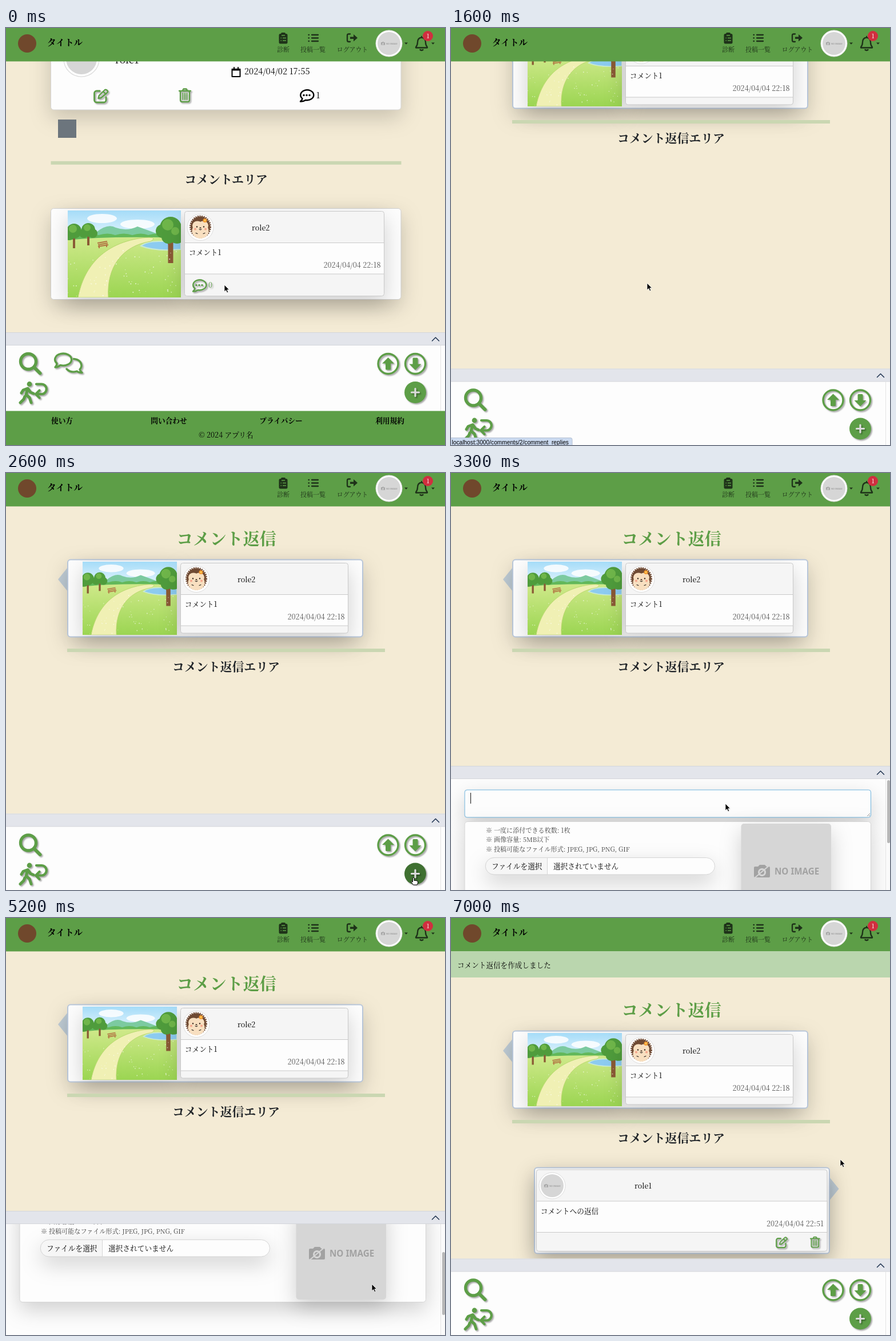
Animation, 768 px wide and 729 px high, one loop 7100 ms. Source, as an HTML page:

```html
<!DOCTYPE html>
<html lang="ja">
<head>
<meta charset="utf-8">
<style>
html, body { margin: 0; height: 100%; overflow: hidden; background: #f4ebd5; }
svg { display: block; width: 100vw; height: 100vh; }
text { font-family: 'Noto Serif CJK JP', 'Noto Serif', 'Noto Sans CJK JP', serif; font-weight: 500; }
.bold { font-weight: 700; }
.sans { font-family: 'Noto Sans', sans-serif; }
.mid { text-anchor: middle; }
.end { text-anchor: end; }
.soft { filter: drop-shadow(0 13px 18px rgba(0, 0, 0, .18)); }
.lift { filter: drop-shadow(2px 2px 1px rgba(0, 0, 0, .35)); }
.line { fill: none; stroke: currentColor; stroke-linecap: round; stroke-linejoin: round; }
.green { color: #5d9e47; fill: #5d9e47; }
</style>
</head>
<body>
<svg id="stage" viewBox="0 0 768 729">
  <defs>
    <linearGradient id="sky" x2="0" y2="1"><stop stop-color="#a5dcf8"/><stop offset="1" stop-color="#f4fbff"/></linearGradient>
    <linearGradient id="grass" x2="0" y2="1"><stop stop-color="#cfe98a"/><stop offset="1" stop-color="#9bd552"/></linearGradient>
    <clipPath id="panelClip"><path d="M0 23h768v300H0z"/></clipPath>
    <symbol id="park" viewBox="0 0 198 152" preserveAspectRatio="none">
      <path fill="url(#sky)" d="M0 0h198v60H0z"/>
      <g fill="#fff" opacity=".85"><ellipse cx="60" cy="14" rx="26" ry="8"/><ellipse cx="122" cy="24" rx="30" ry="8"/></g>
      <path fill="#7ccaa0" d="M0 48Q30 36 50 38 70 22 84 30 104 37 122 28 142 35 160 42L198 38V60H0z"/>
      <path fill="#62b85a" d="M0 43q14-5 25 0 15-5 29 0 16-5 29 0 15-5 30 0 15-5 28 0 15-5 28 0l29-2v22H0z"/>
      <path fill="url(#grass)" d="M0 52Q70 44 198 48V152H0z"/>
      <path fill="#8ccbf0" stroke="#c9ead4" stroke-width="2" d="M128 62q10-9 36-8h34v14q-45 4-70-6z"/>
      <path fill="#f0f0b4" stroke="#b5d66a" d="M18 152C26 110 52 59 130 48q30-3 15 6C94 62 68 100 71 152z"/>
      <g fill="none" stroke="#8a5a35"><path stroke-width="4" d="M11 44v22M36 43v18"/><path stroke-width="9" d="M180 48v44"/><path stroke-width="3" d="M180 62l-10-12"/></g>
      <g fill="#4f9c3c"><circle cx="11" cy="36" r="13"/><circle cx="3" cy="43" r="9"/><circle cx="36" cy="34" r="12"/><circle cx="44" cy="40" r="8"/><circle cx="28" cy="40" r="8"/><circle cx="180" cy="30" r="19"/><circle cx="166" cy="36" r="12"/><circle cx="191" cy="43" r="15"/><circle cx="176" cy="46" r="12"/></g>
      <g fill="#6fb64a"><circle cx="9" cy="32" r="7"/><circle cx="34" cy="30" r="6"/><circle cx="175" cy="25" r="10"/><circle cx="188" cy="36" r="7"/></g>
      <path fill="none" stroke="#b27342" stroke-width="2" d="M52 57l17-3M53 60l17-3M53 63l18-3M55 61v5M68 59v5"/>
      <g id="flowers" fill="#fff" opacity=".65"/>
    </symbol>
    <g id="noImage" fill="#a2a2a2">
      <path fill-rule="evenodd" d="M-54-8h5l3-3h9l3 3h4q2 0 2 2V9q0 2-2 2h-24q-2 0-2-2V-6q0-2 2-2zM-42-5a7 7 0 1 0 .1 0z"/>
      <circle cx="-42" cy="2" r="4"/><path stroke="#d6d6d6" stroke-width="2" d="M-55 12l26-22"/>
      <text class="sans bold" x="-20" y="6" font-size="15.2">NO IMAGE</text>
    </g>
    <g id="blank"><circle r="23" fill="#fff" stroke="#ddd"/><circle r="20" fill="#d6d6d6"/><use href="#noImage" transform="scale(.25)"/></g>
    <g id="hog">
      <circle r="23" fill="#fff" stroke="#ddd"/>
      <ellipse cy="-1" rx="17" ry="18" fill="#6f4a33" stroke="#6f4a33" stroke-width="4" stroke-dasharray="2 1.5"/>
      <ellipse cy="6" rx="14.5" ry="13.5" fill="#f8dfc0"/><ellipse cx="-5" cy="-3" rx="9" ry="8" fill="#f8dfc0"/><ellipse cx="5" cy="-3" rx="9" ry="8" fill="#f8dfc0"/>
      <g fill="#3a281e"><circle cx="-6" cy="-1" r="1.2"/><circle cx="6" cy="-1" r="1.2"/><ellipse cy="1" rx="1.6" ry="1.100"/></g>
      <g fill="#f4a58b"><circle cx="-9" cy="3" r="2"/><circle cx="9" cy="3" r="2"/></g>
      <path class="line" stroke="#3a281e" d="M-2 3.500q2 2 4 0M-8 10l3 1M8 10l-3 1"/>
      <circle cx="8" cy="-12" r="3.500" fill="#f39a32"/><circle cx="8" cy="-12" r="1.200" fill="#fbe36a"/>
    </g>
    <g id="edit" class="line"><path stroke-width="2.8" d="M11 4H5.5a4 4 0 0 0-4 4v12a4 4 0 0 0 4 4H18a4 4 0 0 0 4-4v-5"/><path stroke-width="2.4" d="M8.5 17l1.3-5L20 2q2-1 4 1t0 4L13.500 16zM17 5l4 4"/></g>
    <g id="trash" class="line" stroke-width="2.3"><path d="M1 5h20M6.500 5l2-3.500h5l2 3.500M3 5v16q0 3 3 3h10q3 0 3-3V5"/><path stroke-width="1.8" d="M7.500 9v11M11 9v11M14.500 9v11"/></g>
    <g id="dots"><path class="line" stroke-width="2.4" d="M5.500 16.500A11.500 9 0 1 1 11 19Q7 22 2 21.500 5 19 5.500 16.500z"/><g fill="currentColor"><circle cx="8" cy="10.500" r="1.7"/><circle cx="13" cy="10.500" r="1.7"/><circle cx="18" cy="10.500" r="1.7"/></g></g>
    <g id="arrow"><circle r="17.5" fill="none" stroke="currentColor" stroke-width="3.4"/><path fill="currentColor" d="M0-11L10.500-.5H4.500V9q0 1.500-1.500 1.500h-6Q-4.500 10.500-4.500 9V-.5h-6z"/></g>
  </defs>
  <g id="post"></g>
  <g id="reply"></g>
  <g id="panel"></g>
  <g id="footer"></g>
  <g id="nav"></g>
  <g id="flash"></g>
  <g id="status"></g>
  <g id="arrowCursor"><path d="M0 0v12l2.800-2.500 2 4.200 2-.9-2-4.100H8.500z" stroke="#fff" stroke-width=".8"/></g>
  <g id="handCursor"><path fill="#fff" stroke="#000" d="M-1.500 1q1.500-1.500 2.500 0v4.500q5-.5 6.500 1.500v3l-1.500 3H-.5l-4-5.500q.5-1.500 3 .5z"/></g>
</svg>
<script>
const $ = id => document.getElementById(id);
const text = (x, y, s, size = 12.7, attrs = '') => `<text x="${x}" y="${y}" font-size="${size}" ${attrs}>${s}</text>`;
const rect = (x, y, w, h, fill, attrs = '') => `<rect x="${x}" y="${y}" width="${w}" height="${h}" fill="${fill}" ${attrs}/>`;
const use = (id, x, y, attrs = '', scale = 1) => `<g ${attrs}><use href="#${id}" transform="translate(${x} ${y}) scale(${scale})"/></g>`;
const park = (x, y, w, h) => `<g class="soft"><svg x="${x}" y="${y}" width="${w}" height="${h}"><use href="#park" width="${w}" height="${h}"/></svg></g>`;
const MID = 'class="mid"', HEAD = 'class="mid bold" fill="#212529"', LIFT = 'class="lift green"';

const comment = (x, y, w, h, avatar, name, nameX, body, date) =>
  rect(x, y, w, h, '#f5f5f5', 'rx="4" stroke="#c9c9c9" class="soft"') +
  rect(x, y + 55, w, 54.5, '#fdfdfd', 'stroke="#c9c9c9"') +
  use(avatar, x + 27.5, y + 28) + text(nameX, y + 33, name) +
  text(x + 7.3, y + 76.5, body) + text(x + w - 6, y + 98.5, date, 12.7, 'class="end" fill="#555"');

let seed = 7;
const random = () => (seed = seed * 16807 % 2147483647) / 2147483647;
$('flowers').innerHTML = Array.from({ length: 70 }, () =>
  `<circle cx="${random() * 198}" cy="${70 + random() * 80}" r="${.5 + random() * .6}"/>`).join('');

$('post').innerHTML =
  rect(78.5, -60, 612.5, 203, '#fdfdfd', 'rx="5" stroke="#d5d5d5" class="soft"') +
  use('blank', 132, 54, '', 1.35) + text(191, 62, 'role1', 17.4) +
  `<path class="line" stroke-width="2" d="M395.500 72h14v13h-14zM395.500 73.500h14M399 69v3M406 69v3"/>` +
  text(417, 81, '2024/04/02 17:55', 14.55) +
  use('edit', 153, 106, LIFT) + use('trash', 302, 105, LIFT) +
  use('dots', 513, 107) + text(542.5, 123, '1', 14.55) +
  rect(91, 160, 32, 32, '#6c757d') + rect(78.5, 232.800, 613, 6, '#cad7b2') +
  text(385, 272, 'コメントエリア', 20.9, HEAD) +
  rect(78.5, 315.5, 612.5, 159, '#fdfdfd', 'rx="5" stroke="#cfcfcf" class="soft"') +
  park(108, 319, 198, 152) +
  comment(312.5, 320.5, 349, 148, 'hog', 'role2', 430, 'コメント1', '2024/04/04 22:18') +
  use('dots', 325, 439, LIFT) + text(354, 454, '0', 12.7, LIFT);

$('reply').innerHTML =
  text(385.5, 126, 'コメント返信', 29.1, 'class="mid bold" fill="#5d9e47"') +
  `<path fill="#bfccd5" d="M91 186l17-21v42z"/>` +
  rect(108, 151.5, 516, 135, '#fdfdfd', 'rx="5" stroke="#b9c7da" stroke-width="2" class="soft"') +
  park(134, 155, 165, 128) +
  comment(305.5, 157.5, 293, 122.5, 'hog', 'role2', 405, 'コメント1', '2024/04/04 22:18') +
  rect(107, 307, 556, 6, '#cad7b2') + text(385, 346, 'コメント返信エリア', 20.9, HEAD) +
  `<g id="sent"><path fill="#bfccd5" d="M678.500 427.500l-17-21v42z"/>` +
  rect(146, 390.500, 516, 150, '#fdfdfd', 'rx="5" stroke="#b9c7da" stroke-width="2" class="soft"') +
  comment(149.5, 394, 508.5, 142.5, 'blank', 'role1', 321, 'コメントへの返信', '2024/04/04 22:51') +
  use('edit', 568, 511, LIFT, .8) + use('trash', 628, 510.5, LIFT, .8) + '</g>';

$('panel').innerHTML =
  rect(0, 0, 768, 300, '#fdfdfd') +
  `<g id="tools" class="green"><path stroke="#e4e4e4" d="M760.500 23v280"/>
    <g class="lift line"><circle cx="39" cy="51" r="13.500" stroke-width="5.400"/><path stroke-width="6" d="M49.500 61.500l10 10"/></g>
    <g class="lift"><g id="talk"><g class="line" stroke-width="3.400">
      <path d="M118.500 46.500C127 47 132 52 132 58q0 4-3 7 1 3 4 5.500-6 0-9-2.500-11 3.500-18-4"/>
      <path d="M89 54.300A14.500 10.500 0 1 1 95 57.400Q91 61 86 61 89 58.500 89 54.300z"/></g></g></g>
    <g class="lift line" stroke-width="5"><circle cx="41" cy="90.500" r="4.400" fill="currentColor" stroke="none"/>
      <path d="M27 106l3-5 8-3 5 7 5 2M38 99l-3 10 6 5 3 9M33 112l-2 5-6 6"/>
      <path stroke-width="4.200" d="M53 90.500h9a8.700 8.700 0 0 1 0 17.500h-9M58.500 101.500l-6.500 6.500 6.500 6.500"/></g>` +
    use('arrow', 668.5, 55, 'class="lift"') + `<g class="lift"><use href="#arrow" transform="translate(716 55) rotate(180)"/></g>` +
    `<g class="lift"><circle id="plus" cx="716" cy="105" r="19"/></g>
    <path stroke="#dcdcdc" stroke-width="3.200" stroke-linecap="round" class="lift" d="M709.500 105h13M716 98.500v13"/></g>` +
  `<g id="form" clip-path="url(#panelClip)"><g id="fields">` +
    rect(24, 42, 710.5, 48, '#fdfdfd', 'id="box" rx="4" stroke="#ccc" class="soft"') +
    `<path stroke="#777" stroke-width=".8" d="M728 88l5-5M731 88l2-2"/>` +
    text(34, 61.5, '<tspan id="typed"></tspan>') + `<path id="caret" stroke="#111" d="M0 47v19"/>` +
    rect(24, 97.5, 710.5, 172, '#fdfdfd', 'rx="5" stroke="#d5d5d5" class="soft"') +
    ['一度に添付できる枚数: 1枚', '画像容量: 5MB以下', '投稿可能なファイル形式: JPEG, JPG, PNG, GIF']
      .map((s, i) => text(61, 116.500 + i * 16.500, '※ ' + s, 11.1, 'fill="#444"')).join('') +
    rect(60.5, 160.5, 401, 29.5, '#fdfdfd', 'rx="15" stroke="#d5d5d5" class="soft"') +
    `<path fill="#f6f6f6" stroke="#d5d5d5" d="M168.500 160.500V190H75a14.700 14.700 0 0 1 0-29.500z"/>` +
    text(71, 180, 'ファイルを選択') + text(179, 180, '選択されていません') +
    rect(507.5, 101, 157.5, 164, '#d6d6d6', 'rx="5" class="soft"') + use('noImage', 586, 184) + '</g>' +
    rect(761, 23, 7, 300, '#fafafa') + `<path stroke="#e4e4e4" d="M760.500 23v300"/>` +
    rect(763, 25, 5, 110, '#b8b8b8', 'id="thumb" rx="2.500"') + '</g>' +
  rect(-1, .5, 770, 22, '#e3e5eb', 'stroke="#d3d5da"') +
  `<path class="line" color="#1f3350" stroke-width="1.500" d="M745.500 15l6-6 6 6"/>`;

$('footer').innerHTML = rect(0, 669.5, 768, 60, '#5d9e47') +
  [[98, '使い方'], [285, '問い合わせ'], [481, 'プライバシー'], [671.5, '利用規約']]
    .map(([x, s]) => text(x, 691, s, 12.7, 'class="mid bold"')).join('') +
  text(385, 716, '© 2024 アプリ名', 12.7, MID);

$('nav').innerHTML = rect(0, 0, 768, 58.4, '#5d9e47') +
  '<circle cx="37" cy="27" r="16" fill="#70482c"/>' + text(72, 30.5, 'タイトル', 15.6, 'class="bold"') +
  `<g fill="#1e3219" color="#1e3219">` +
  text(485, 41.5, '診断', 11, MID) + text(537, 41.5, '投稿一覧', 11, MID) + text(606, 41.5, 'ログアウト', 10.9, MID) +
  rect(477.5, 10, 15, 17.5, '#1e3219', 'rx="2.500"') + rect(481, 8, 8, 5, '#1e3219', 'rx="2"') +
  `<path stroke="#5d9e47" stroke-width="1.300" d="M482 13h6M480.500 17.500h1.500M484 17.500h6M480.500 22h1.500M484 22h6"/>
  <path class="line" stroke-width="2.300" d="M529.500 12h.5M529.500 17.500h.5M529.500 23h.5M535 12h11M535 17.500h11M535 23h11"/>
  <path class="line" stroke-width="2.300" d="M602 10.500h-2.500q-2.500 0-2.500 2.500v8.500q0 2.500 2.500 2.500h2.500"/>
  <path d="M602 15.500h6v-4.500l7 6.300-7 6.300v-4.500h-6z"/>
  <path d="M697 25.500h6l-3 3.200zM744 25.500h6l-3 3.200z"/>
  <path class="line" stroke-width="2.300" d="M727 15v1.500q-7 1-7 8.500 0 5-3 8.500v1h20v-1q-3-3.500-3-8.500 0-7.500-7-8.500M724.500 38q2.500 2 5 0"/></g>` +
  use('blank', 670, 27) + '<circle cx="738" cy="14" r="9" fill="#d02f3f"/>' +
  text(738, 18, '1', 11, 'class="mid" fill="#fff"');

$('flash').innerHTML = rect(0, 58, 768, 46, '#bad6ae') + text(11, 86.5, 'コメント返信を作成しました', 12.6);
$('status').innerHTML = rect(-4, 716.5, 216, 18, '#cbdaf0', 'rx="3" stroke="#b4c0d2"') +
  text(1.5, 727.5, 'localhost:3000/comments/2/comment_replies', 10.2, `style="font-family:'Liberation Sans',sans-serif;font-weight:400"`);

const LOOP = 7100, OPENED = 1500, EXPAND = 2700, SENT = 5300, MESSAGE = 'コメントへの返信';
const mouse = [[0, 382, 449], [600, 382, 449], [900, 363, 447], [1100, 343, 446], [1900, 343, 446], [2500, 713, 707],
  [2700, 713, 707], [3100, 480, 578], [3900, 480, 578], [4300, 487, 650], [4800, 487, 650], [5200, 640, 640],
  [5500, 640, 640], [6000, 677, 415], [6700, 681, 422], [LOOP, 681, 422]];
const ease = (t, from, to) => {
  const p = Math.min(1, Math.max(0, (t - from) / (to - from)));
  return p * p * (3 - 2 * p);
};
const show = (id, on) => $(id).style.display = on ? '' : 'none';
const move = (id, x, y, extra = '') => $(id).setAttribute('transform', `translate(${x} ${y}) ${extra}`);

function draw(t) {
  const opened = t >= OPENED, sent = t >= SENT, form = t >= EXPAND && !sent;
  show('post', !opened); show('footer', !opened); show('talk', !opened);
  show('reply', opened); show('sent', sent); show('flash', sent);
  show('tools', !form); show('form', form);
  show('status', t >= 1000 && t < 2200);

  move('reply', 0, sent ? 58.5 - 12.5 * ease(t, 6100, 6800) : -146 * (1 - ease(t, 1800, 2300)));
  move('panel', 0, !opened ? 532 : form ? 595.5 - 83.5 * ease(t, EXPAND, 3000) : 595.5);
  const beat = 1.03 - .03 * Math.cos(t / 900 * Math.PI);
  move('talk', 108.5, 54.5, `scale(${beat}) translate(-108.5 -54.5)`);

  const typed = Math.min(8, Math.max(0, Math.floor((t - 3200) / 110)));
  $('typed').textContent = MESSAGE.slice(0, typed);
  move('caret', 34.5 + typed * 12.7, 0);
  show('caret', t >= 3100);
  $('box').setAttribute('stroke', t >= 3100 ? '#70b4dd' : '#ccc');
  const scroll = ease(t, 4400, 4900);
  move('fields', 0, -110 * scroll);
  move('thumb', 0, 47 * scroll);

  const hover = t >= 2500 && t < EXPAND, hand = hover || (t >= 1000 && t < OPENED);
  $('plus').setAttribute('fill', hover ? '#3f7031' : '#5d9e47');
  const i = mouse.findIndex(p => p[0] > t), [t0, x0, y0] = mouse[i - 1], [t1, x1, y1] = mouse[i];
  const p = ease(t, t0, t1), at = [x0 + (x1 - x0) * p, y0 + (y1 - y0) * p];
  move('arrowCursor', ...at); move('handCursor', ...at);
  show('arrowCursor', !hand); show('handCursor', hand);
}

// The screen advances in steps of 100 ms.
const start = performance.now();
(function tick() {
  draw(Math.floor((performance.now() - start) % LOOP / 100) * 100);
  requestAnimationFrame(tick);
})();
</script>
</body>
</html>
```
